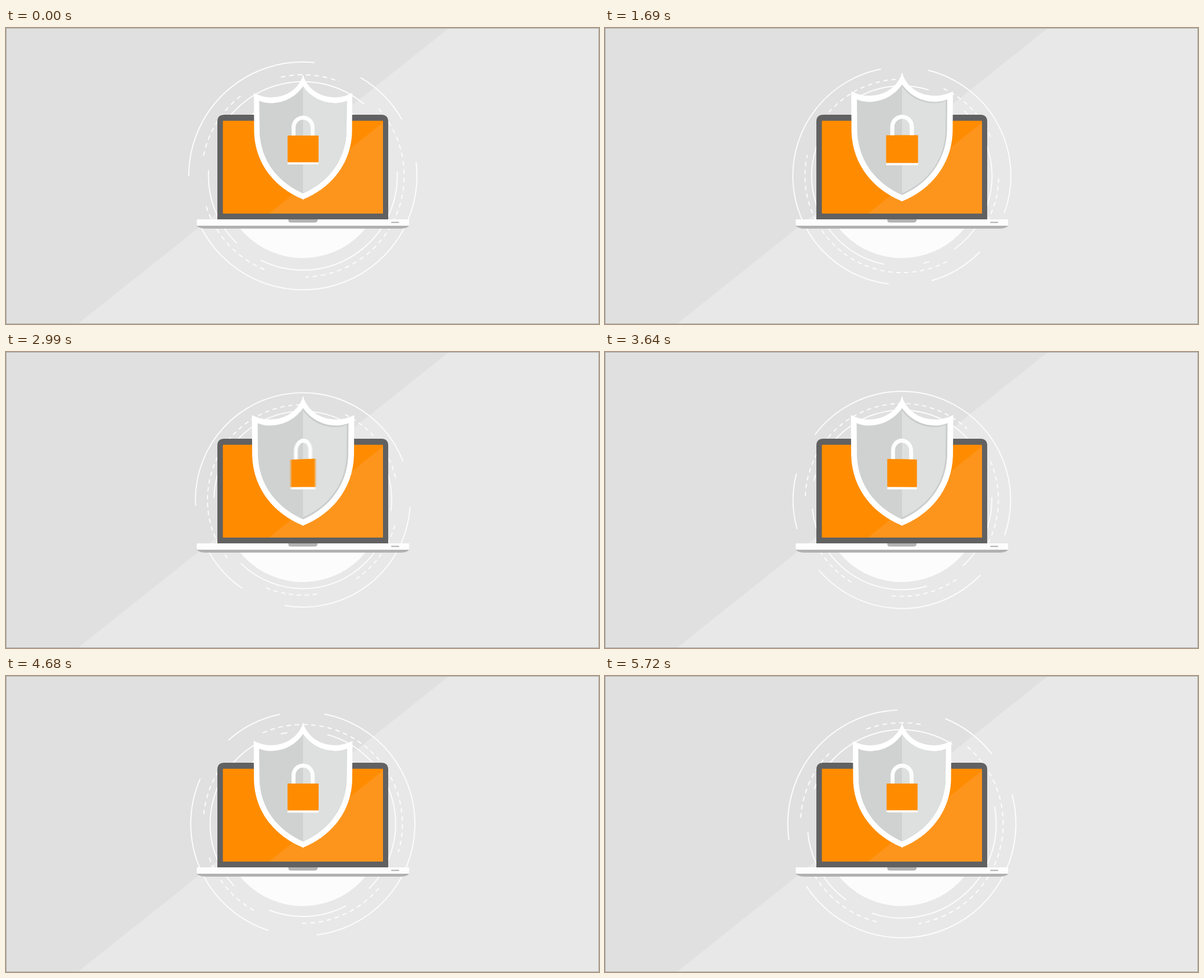
Recreate the animation shown at these times as an HTML page. Size 1024x512 px, loop 5850 ms.

```html
<!DOCTYPE html>
<html lang="en">
<head>
<meta charset="utf-8">
<title>Secure laptop</title>
<style>
  html, body { margin: 0; width: 100%; height: 100%; overflow: hidden; background: #e8e8e8; }
  svg { display: block; width: 100vw; height: 100vh; }
</style>
</head>
<body>
<svg viewBox="0 0 1024 512" xmlns="http://www.w3.org/2000/svg">
  <defs>
    <path id="outer" d="M514 82H513C507 100 490 120 457 120C447 120 437 117 428 112.5L428.5 180C430 235 465 277 513 296.5H514Z"/>
    <path id="inner" d="M513 101C501 118 482 130 457 130C450 130 443 128.5 437.5 126L438 180C440 228 468 266 513 286Z"/>
    <clipPath id="screen"><rect x="374.5" y="160.5" width="276.5" height="160.5" rx="1"/></clipPath>
  </defs>

  <rect width="1024" height="512" fill="#e8e8e8"/>
  <path d="M0 0H765L124 512H0Z" fill="#e0e0e0"/>
  <rect x=".5" y=".5" width="1023" height="511" fill="none" stroke="#ababab"/>

  <g id="rings" fill="none" stroke="#fcfcfc" stroke-width="2"></g>
  <circle cx="512.5" cy="258" r="140" fill="#fcfcfc"/>

  <path d="M365 332V162Q365 150 377 150H648Q660 150 660 162V332Z" fill="#616161"/>
  <g clip-path="url(#screen)">
    <rect x="374" y="160" width="278" height="162" fill="#ff8c00"/>
    <path d="M654 161V322H453Z" fill="#fd951c"/>
  </g>
  <path d="M329.5 340H696V342.5Q691 347 681 347H345Q335 347 329.5 342.5Z" fill="#b1b1b1"/>
  <rect x="329.5" y="331" width="366.5" height="11" fill="#fdfdfd"/>
  <path d="M487.5 331H538V333Q537 336.5 533 336.5H492Q488 336.5 487.5 333Z" fill="#b3b3b3"/>
  <rect x="665" y="335.3" width="14" height="2" rx="1" fill="#b0b0b0"/>

  <g id="frame">
    <g fill="#fff">
      <use href="#outer"/>
      <use href="#outer" transform="matrix(-1 0 0 1 1026 0)"/>
    </g>
    <use href="#inner" fill="#d0d2d1"/>
    <use href="#inner" fill="#cbcdcc" transform="matrix(-1 0 0 1 1026 0)"/>
  </g>
  <use href="#inner" fill="#d0d2d1"/>
  <use href="#inner" fill="#dde0df" transform="matrix(-1 0 0 1 1026 0)"/>
  <g id="lock"></g>
</svg>
<script>
const LOOP = 5850, STEP = 130;
const CX = 512.6, CY = 255.8;
const MID = 513;
const $ = id => document.getElementById(id);
const rad = deg => deg * Math.PI / 180;
const clamp = x => Math.min(1, Math.max(0, x));
const ease = x => (1 - Math.cos(Math.PI * clamp(x))) / 2;

function add(parent, attrs) {
  const el = document.createElementNS('http://www.w3.org/2000/svg', 'path');
  for (const k in attrs) el.setAttribute(k, attrs[k]);
  return parent.appendChild(el);
}

// Angles run clockwise from the top.
function arc(r, from, to) {
  const at = a => `${r * Math.sin(rad(a))} ${-r * Math.cos(rad(a))}`;
  return `M${at(from)}A${r} ${r} 0 ${to - from > 180 ? 1 : 0} 1 ${at(to)}`;
}

const RINGS = [
  { r: 197, arcs: [[269.8, 365.8], [30.4, 60.2], [83, 245]] },
  { r: 175, arcs: [[347.5, 380.9], [281.5, 324], [48.3, 178.5], [202.3, 254]], dash: '8 6.5' },
  { r: 163, arcs: [[87.3, 206.5], [224.3, 273.3], [299.8, 400.4], [58.3, 62.3]] }
];
for (const { r, arcs, dash } of RINGS)
  for (const [from, to] of arcs)
    add($('rings'), { d: arc(r, from, to), 'stroke-dasharray': dash || 'none' });

// Lock outlines as points relative to the vertical axis.
const box = (w, top, bottom) => [[-w, top], [w, top], [w, bottom], [-w, bottom]];
function bow(r) {
  const pts = [[-r, 188]];
  for (let a = 180; a >= 0; a -= 10)
    pts.push([r * Math.cos(rad(a)), 171.5 - r * Math.sin(rad(a))]);
  pts.push([r, 188]);
  return pts;
}
const PARTS = [
  { pts: [...bow(19.7), ...bow(13).reverse()], fill: '#fdfdfd' },
  { pts: box(26.6, 231, 236), fill: '#fdfdfd' },
  { pts: box(26.6, 186, 232.3), fill: '#ff8c00' }
];

// Two faint copies just before and after soften fast turns.
const COPIES = [-30, 30, 0].map(shift => {
  const g = $('lock').appendChild(document.createElementNS('http://www.w3.org/2000/svg', 'g'));
  if (shift) g.setAttribute('opacity', 0.4);
  return { shift, paths: PARTS.map(p => add(g, { fill: p.fill })) };
});

function lockAngle(t) {
  const d = (t - 2860) / 3900;
  const turn = 1 - Math.pow(1 - 2 * Math.min(0.5, Math.abs(d)), 4);
  return 180 + 180 * Math.sign(d) * turn;
}

function outline(pts, angle) {
  const c = Math.cos(rad(angle)), s = Math.sin(rad(angle));
  return 'M' + pts.map(([u, y]) => {
    const depth = 1 + 0.0009 * u * s;
    return `${(MID + u * c).toFixed(2)} ${(236 + (y - 236) * depth).toFixed(2)}`;
  }).join('L') + 'Z';
}

function draw(t) {
  const down = 2600;
  const shrink = t < down ? ease(t / down) : 1 - ease((t - down) / (LOOP - down));
  const size = 1 - shrink * 12 / 197;
  $('rings').setAttribute('transform',
    `translate(${CX} ${CY}) rotate(${360 * t / LOOP}) scale(${size})`);

  const grow = 1 + 0.04 * (ease((t - 800) / 1200) - ease((t - 3720) / 1200));
  const zoom = `translate(${MID} 200) scale(${grow}) translate(${-MID} -200)`;
  $('frame').setAttribute('transform', zoom);
  $('lock').setAttribute('transform', zoom);

  for (const { shift, paths } of COPIES) {
    const angle = lockAngle(t + shift);
    paths.forEach((p, i) => p.setAttribute('d', outline(PARTS[i].pts, angle)));
  }
}

const start = performance.now();
function tick() {
  const t = (performance.now() - start) % LOOP;
  draw(Math.floor(t / STEP) * STEP);
  requestAnimationFrame(tick);
}
tick();
</script>
</body>
</html>
```
